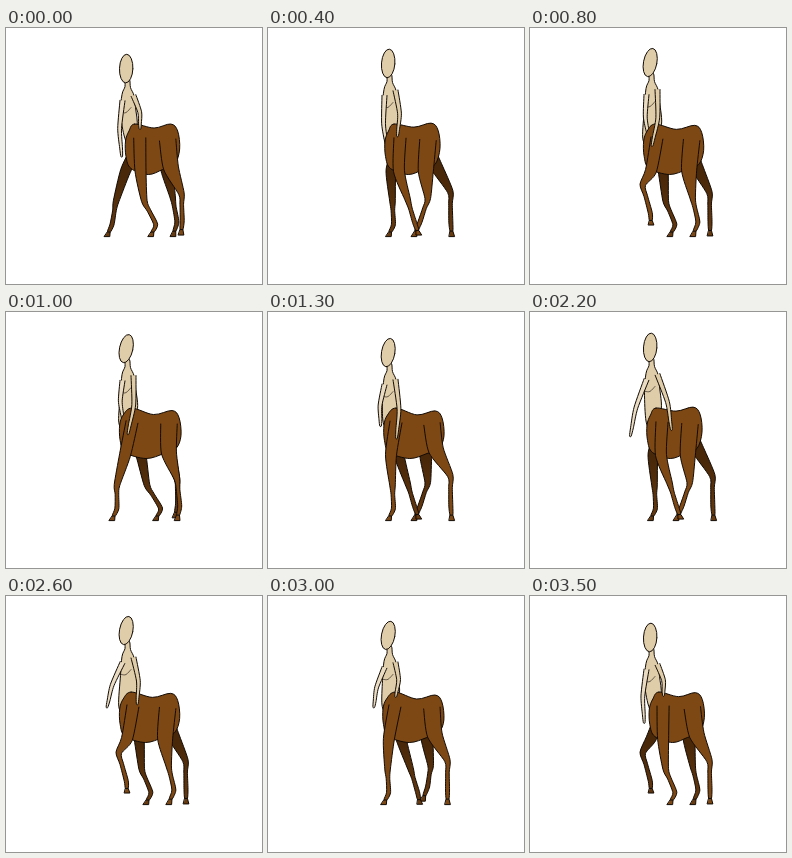
Animation, 256 px wide and 256 px high, one loop 3600 ms. Source, as an HTML page with a canvas:

```html
<!DOCTYPE html>
<html lang="en">
<head>
<meta charset="utf-8">
<title>Centaur walk</title>
<style>
html, body { margin: 0; width: 100%; height: 100%; overflow: hidden; background: #fff; }
canvas { display: block; width: 256px; height: 256px; }
</style>
</head>
<body>
<canvas id="stage" width="256" height="256"></canvas>
<script>
const ctx = document.getElementById('stage').getContext('2d');
const LOOP = 3600, STEP = 100, STRIDE = 18, SWAY = 36, GROUND = 208;
const SKIN = '#dfcdaa', PALE = '#e9dcc2', COAT = '#7e4814', INK = '#120a04';

const shade = ctx.createLinearGradient(0, 150, 0, 210);
shade.addColorStop(0, '#492809');
shade.addColorStop(1, '#693b10');

// Swings between -1 and 1, highest at the given step
const wave = (t, period, peak) => Math.cos(2 * Math.PI * (t - peak) / period);
const mix = (a, b, k) => [a[0] + (b[0] - a[0]) * k, a[1] + (b[1] - a[1]) * k];

// Smooth curve through points; a higher slack gives sharper corners
function curve(pts, closed, slack = 6) {
  const n = pts.length;
  const p = i => closed ? pts[(i + n) % n] : pts[Math.max(0, Math.min(n - 1, i))];
  const path = new Path2D();
  path.moveTo(...pts[0]);
  for (let i = 0; i < (closed ? n : n - 1); i++) {
    const [a, b, c, d] = [p(i - 1), p(i), p(i + 1), p(i + 2)];
    path.bezierCurveTo(
      b[0] + (c[0] - a[0]) / slack, b[1] + (c[1] - a[1]) / slack,
      c[0] - (d[0] - b[0]) / slack, c[1] - (d[1] - b[1]) / slack, c[0], c[1]);
  }
  return path;
}

function paint(path, fill, width = 1) {
  if (fill) {
    ctx.fillStyle = fill;
    ctx.fill(path);
  }
  ctx.strokeStyle = INK;
  ctx.lineWidth = width;
  ctx.stroke(path);
}

// Tapered limb around a chain of joints, open at its root
function limb(joints, widths, fill) {
  const left = [], right = [];
  joints.forEach(([x, y], i) => {
    const a = joints[Math.max(0, i - 1)], b = joints[Math.min(joints.length - 1, i + 1)];
    const dx = b[0] - a[0], dy = b[1] - a[1], k = widths[i] / (Math.hypot(dx, dy) || 1);
    left.push([x + dy * k, y - dx * k]);
    right.unshift([x - dy * k, y + dx * k]);
  });
  paint(curve(left.concat(right), false, 8), fill);
}

// Toe position since touchdown: steady push back, then a swing forward
function toe(q, front, reach, stance, ease, height) {
  const s = Math.max(0, (q - stance) / (STRIDE - stance));
  const x = front + reach * (s ? 1 - s ** ease : q / stance);
  const lift = height * Math.sin(Math.PI * s ** 3);
  return { x, y: GROUND - lift, lift, flex: Math.sin(Math.PI * s) ** 0.6 };
}

function foreleg(q) {
  const c = wave(q, STRIDE, 10), foot = toe(q, 101, 51, 10.5, 3.5, 13);
  return [
    [127 + 8 * c, 143],
    [128 + 15 * c + 4 * wave(q, STRIDE / 2, 4), 173 - 1.4 * foot.lift],
    [foot.x + 5 - 10 * foot.flex, foot.y - 11.5],
    [foot.x, foot.y]
  ];
}

function hindleg(q) {
  const c = wave(q, STRIDE, 10.5), foot = toe(q, 146, 42, 10, 1.7, 4);
  return [
    [163 + 6 * c, 141 - 3 * c],
    [171 + 13 * c, 167 - 4 * c],
    [foot.x + 2.5 - 4 * c, foot.y - 14],
    [foot.x, foot.y]
  ];
}

function leg(gait, step, root, bulk, fill) {
  const [top, knee, fetlock, tip] = gait((step + STRIDE) % STRIDE);
  const heel = mix(fetlock, tip, 0.65);
  limb([root, top, knee, mix(knee, fetlock, 0.4), fetlock, heel],
    [bulk * 1.1, bulk, 2.8, 1.8, 2, 1.4], fill);
  const [x, y] = tip;
  const hoof = new Path2D();
  hoof.moveTo(heel[0] - 1.2, heel[1]);
  hoof.lineTo(heel[0] + 1.4, heel[1]);
  hoof.lineTo(x + 2.8, y + 0.6);
  hoof.lineTo(x - 2.6, y + 0.6);
  hoof.closePath();
  paint(hoof, fill);
}

function arm(shoulder, hand, bend, fill) {
  const elbow = mix(shoulder, hand, 0.5);
  elbow[0] += bend;
  limb([shoulder, elbow, mix(elbow, hand, 0.7), hand], [2.5, 1.9, 1.4, 0.8], fill);
}

function barrel(t, chest) {
  const rump = 174 + 2 * wave(t, STRIDE, 13), top = 97 + 2 * wave(t, STRIDE, 12);
  const withers = 127 + 2 * wave(t, STRIDE, 16), belly = 146.5;
  paint(curve([
    [withers, 96], [(withers + rump) / 2 - 3, top + 4], [rump - 9, top], [rump - 2, top + 7],
    [rump, top + 25], [rump - 5, belly - 10], [rump - 17, belly - 5], [(chest + rump) / 2 - 4, belly],
    [chest + 6, belly - 6], [chest + 1, belly - 18], [chest + 0.5, 113], [chest + 4, 103]
  ], true), COAT);
  return rump;
}

function torso(bob, chest) {
  const y = 53 + bob;
  paint(curve([
    [119, y - 4], [119, y + 3], [116, y + 11], [114.5, y + 30], [chest - 0.5, 109],
    [chest + 4, 114], [131, 99], [129.5, y + 24], [128, y + 12], [124.5, y + 4], [123.5, y - 4]
  ], true), SKIN);
  paint(curve([[115.5, y + 29], [120, y + 29], [125, y + 24]]), null, 0.6);
}

function head(t, bob) {
  const tilt = 7 + 5 * wave(t, STRIDE, 10);
  const path = new Path2D();
  path.ellipse(120.2, 38 + bob, 6.7, 14.3, tilt * Math.PI / 180, 0, Math.PI * 2);
  paint(path, SKIN);
}

function draw(t) {
  ctx.fillStyle = '#fff';
  ctx.fillRect(0, 0, 256, 256);
  const bob = -4 * wave(t, STRIDE, 6.5), chest = 116 + 3 * wave(t, STRIDE, 0);
  const step = t % STRIDE;

  leg(hindleg, (step + 5) % STRIDE, [160, 122], 6, shade);
  leg(foreleg, step, [129, 124], 5, shade);
  torso(bob, chest);
  head(t, bob);
  arm([116.5, 70 + bob],
    [110 - 10 * wave(t, SWAY, 23.5), 119 + 10 * wave(t, STRIDE, 1)], -2.5, PALE);
  const rump = barrel(t, chest);
  leg(hindleg, step - 4, [rump - 12, 112], 7.5, COAT);
  leg(foreleg, step - 9, [130 + 4 * wave(t, STRIDE, 1), 110], 5.5, COAT);
  arm([127.5, 65 + bob], [
    132 + 6 * wave(t, SWAY, 22) + 7 * wave(t, STRIDE, 1),
    113 + 14 * wave(t, SWAY, 15)
  ], 3, SKIN);
}

ctx.lineJoin = ctx.lineCap = 'round';
const start = performance.now();
function tick() {
  draw(Math.floor((performance.now() - start) % LOOP / STEP));
  requestAnimationFrame(tick);
}
tick();
</script>
</body>
</html>
```
